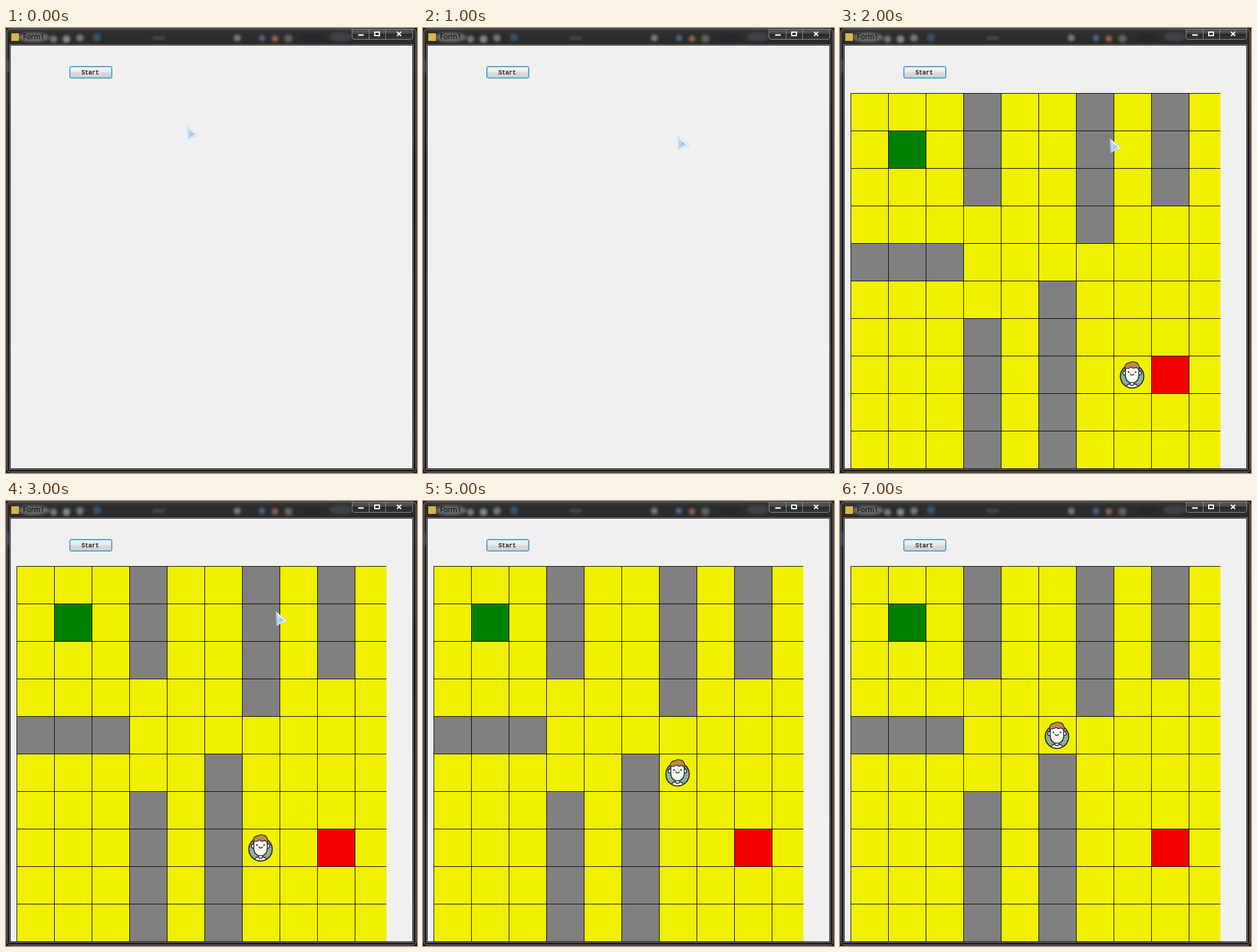
Recreate the animation shown at these times as an HTML page. Size 700 by 759 pixels, loop 8 s.

```html
<!DOCTYPE html>
<html lang="en">
<head>
<meta charset="utf-8">
<title>Grid walk</title>
<style>
html, body { margin: 0; width: 100%; height: 100%; overflow: hidden; background: #17151a; }
svg { display: block; width: 700px; height: 759px; }
.crisp { shape-rendering: crispEdges; }
.title { font: 12px "Open Sans", sans-serif; }
.label { font: 10px "Liberation Mono", monospace; stroke: #000; stroke-width: .25; }
.hot, .board, .walker, .cursor { animation: 8s step-end infinite; }
.hot { animation-name: hot; }
.board { animation-name: board; }
.walker { animation-name: walk; }
.cursor { animation-name: point; }

@keyframes hot {
  0%, 12.5% { opacity: 0; }
  6.25% { opacity: 1; }
}
@keyframes board {
  0% { visibility: hidden; }
  18.75%, 100% { visibility: visible; }
}
@keyframes walk {
  0% { transform: translate(530px, 559px); }
  25% { transform: translate(466px, 559px); }
  37.5% { transform: translate(402px, 559px); }
  50% { transform: translate(402px, 495px); }
  62.5% { transform: translate(402px, 431px); }
  75% { transform: translate(402px, 367px); }
  87.5%, 100% { transform: translate(338px, 367px); }
}
@keyframes point {
  0% { transform: translate(309px, 168px); opacity: 1; }
  6.25% { transform: translate(140px, 73px); opacity: 1; }
  12.5% { transform: translate(434px, 185px); opacity: 1; }
  18.75% { transform: translate(456px, 190px); opacity: 1; }
  25% { transform: translate(460px, 190px); opacity: 1; }
  50%, 100% { transform: translate(460px, 190px); opacity: 0; }
}
</style>
</head>
<body>
<svg viewBox="0 0 700 759">
  <defs>
    <linearGradient id="bar" x2="0" y2="1">
      <stop offset="0" stop-color="#3a3a3a"/>
      <stop offset=".3" stop-color="#2d2d2d"/>
      <stop offset="1" stop-color="#292929"/>
    </linearGradient>
    <linearGradient id="side" x2="0" y2="1">
      <stop offset="0" stop-color="#2b2b2d"/>
      <stop offset=".3" stop-color="#1b1d21"/>
      <stop offset="1" stop-color="#242226"/>
    </linearGradient>
    <linearGradient id="caption" x2="0" y2="1">
      <stop offset="0" stop-color="#5c5c5c"/>
      <stop offset=".48" stop-color="#454545"/>
      <stop offset=".5" stop-color="#262626"/>
      <stop offset="1" stop-color="#393939"/>
    </linearGradient>
    <linearGradient id="face" x2="0" y2="1">
      <stop offset="0" stop-color="#f2f2f2"/>
      <stop offset=".48" stop-color="#ebebeb"/>
      <stop offset=".5" stop-color="#dddddd"/>
      <stop offset="1" stop-color="#cfcfcf"/>
    </linearGradient>
    <linearGradient id="hotFace" x2="0" y2="1">
      <stop offset="0" stop-color="#eaf6fd"/>
      <stop offset=".48" stop-color="#d9f0fc"/>
      <stop offset=".5" stop-color="#bee6fd"/>
      <stop offset="1" stop-color="#a7d9f5"/>
    </linearGradient>
    <linearGradient id="arrow" x2="1" y2="1">
      <stop offset="0" stop-color="#d3e8fc"/>
      <stop offset="1" stop-color="#6fa9ea"/>
    </linearGradient>
    <filter id="blur" x="-50%" y="-50%" width="200%" height="200%"><feGaussianBlur stdDeviation="2.2"/></filter>
    <filter id="soft" x="-50%" y="-50%" width="200%" height="200%"><feGaussianBlur stdDeviation=".7"/></filter>
    <clipPath id="grid"><rect x="18" y="111" width="630" height="641"/></clipPath>
    <clipPath id="disc"><circle cx="31.5" cy="35" r="20"/></clipPath>
  </defs>

  <!-- window frame -->
  <rect x=".5" y=".5" width="699" height="758" rx="6" fill="url(#side)" stroke="#0c0c0c"/>
  <path d="M1 29V7q0-6 6-6H693q6 0 6 6V29Z" fill="url(#bar)"/>
  <g filter="url(#blur)">
    <ellipse cx="47" cy="16" rx="27" ry="8" fill="#686868"/>
    <circle cx="81" cy="19" r="6" fill="#777"/>
    <circle cx="103" cy="19" r="6.5" fill="#858585"/>
    <circle cx="126" cy="17" r="6.5" fill="#757575"/>
    <circle cx="155" cy="16" r="7" fill="#36526c"/>
    <rect x="249" y="14" width="22" height="6" rx="3" fill="#484848"/>
    <circle cx="394" cy="17" r="6" fill="#777"/>
    <circle cx="436" cy="17" r="5.5" fill="#46658c"/>
    <circle cx="458" cy="18" r="5.5" fill="#96604c"/>
    <circle cx="481" cy="18" r="7" fill="#606060"/>
    <ellipse cx="571" cy="15" rx="20" ry="8" fill="#414145"/>
    <ellipse cx="522" cy="17" rx="18" ry="7" fill="#25252b"/>
    <rect x="2" y="54" width="4" height="22" fill="#46505e"/>
  </g>
  <rect x="1.5" y="1.5" width="697" height="756" rx="6" fill="none" stroke="#8b8b8b"/>
  <rect x="6.5" y="28.5" width="687" height="724" fill="none" stroke="#8f8f8f" class="crisp"/>
  <rect x="7.5" y="29.5" width="685" height="722" fill="#f0f0f0" stroke="#161616" class="crisp"/>

  <rect x="9" y="9" width="13" height="13" fill="#d9b54a"/>
  <text x="29" y="19" class="title">Form1</text>

  <!-- caption buttons -->
  <path d="M589.5 1.5H692.5V15q0 4.500-4.500 4.500H594q-4.500 0-4.500-4.500Z" fill="url(#caption)" stroke="#909090"/>
  <path d="M618.500 2V19M646.500 2V19" stroke="#909090"/>
  <rect x="599.500" y="10.500" width="10" height="3" fill="#fff" stroke="#333" stroke-width=".6"/>
  <rect x="628" y="7" width="8" height="6" fill="none" stroke="#fff" stroke-width="2"/>
  <path d="M666 6.500l7 7M673 6.500l-7 7" stroke="#fff" stroke-width="2.200"/>

  <!-- start button -->
  <rect x="108.500" y="65.500" width="72" height="20" rx="2.500" fill="url(#face)" stroke="#3c7fb1"/>
  <rect x="109.500" y="66.500" width="70" height="18" rx="1.500" fill="none" stroke="#5cc8ea"/>
  <rect class="hot" x="109.500" y="66.500" width="70" height="18" rx="1.500" fill="url(#hotFace)" stroke="#5cc8ea"/>
  <text x="128.500" y="79" class="label">Start</text>

  <!-- board -->
  <g class="board">
    <g class="crisp" clip-path="url(#grid)">
      <rect x="18" y="111" width="630" height="641" fill="#f0f000"/>
      <path fill="#808080" d="M210 111h64v192h-64zM402 111h64v256h-64zM530 111h64v192h-64zM18 367h192v64H18zM338 431h64v320h-64zM210 495h64v256h-64z"/>
      <rect x="82" y="175" width="64" height="64" fill="#008000"/>
      <rect x="530" y="559" width="64" height="64" fill="#f00000"/>
      <path id="lines" fill="none" stroke="#000"/>
    </g>
    <g class="walker" stroke="#2b2a28" stroke-width="1.600" stroke-linejoin="round" stroke-linecap="round">
      <circle cx="31.500" cy="35" r="20" fill="#92b5a3"/>
      <g clip-path="url(#disc)">
        <path d="M12 27H51M11 32H52M11 37H52M12 42H51M15 47H48" stroke="#71978a" stroke-width="1"/>
        <path d="M20 56q1-7 8-8v-5h7v5q7 1 8 8Z" fill="#f4f4f0"/>
        <path d="M27 48q4.500 5 9 0" fill="none"/>
      </g>
      <circle cx="31.500" cy="35" r="20" fill="none"/>
      <ellipse cx="18.500" cy="29.500" rx="2.600" ry="3.600" fill="#f4f4f0"/>
      <ellipse cx="44.500" cy="29.500" rx="2.600" ry="3.600" fill="#f4f4f0"/>
      <path d="M20 21Q20 14 31.500 14T43 21V34Q42 46 31.500 46T20 34Z" fill="#f8f8f5"/>
      <path d="M19.500 25Q17 13 27 12Q31 9 37 11Q45 13 43.500 25Q42 21 38 20Q34 23 30 19Q25 23 21.500 21Z" fill="#c08a50" stroke-width="1.300"/>
      <path d="M28.500 31q3 4 6 0" fill="none" stroke-width="1.400"/>
      <path d="M25.500 27.500v.5M37.500 27.500v.5" stroke-width="2.400"/>
    </g>
  </g>

  <g class="cursor">
    <path d="M1 1L17 15L10 16.500L2 21Z" fill="#9cc4ee" stroke="#b9d5ef" stroke-width="3" opacity=".7" filter="url(#soft)"/>
    <path d="M2 2L16.500 15L9.500 15.500L3 20.500Z" fill="url(#arrow)" stroke="#f5faff" stroke-width="1.700" stroke-linejoin="round"/>
    <path d="M2.500 3V20L9.500 15.500" fill="none" stroke="#78aee8" stroke-width=".7"/>
  </g>
</svg>
<script>
const cell = 64;
let path = "";
for (let i = 0; i <= 10; i++) {
  path += `M${18.5 + i * cell} 111V752M18 ${111.5 + i * cell}H648`;
}
document.getElementById("lines").setAttribute("d", path);
</script>
</body>
</html>
```
